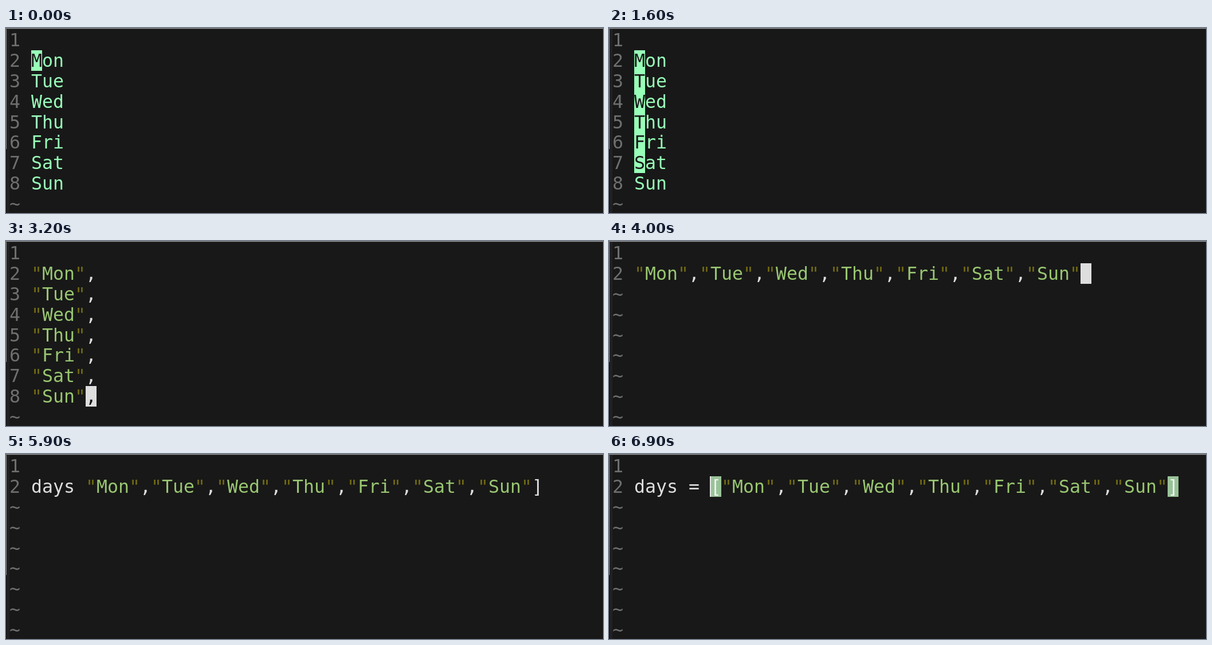
Write an HTML page that moves like this. It is 1042 by 324 pixels and loops after 7 s.

```html
<!DOCTYPE html>
<html lang="en">
<head>
<meta charset="utf-8">
<title>Editing a list of days</title>
<style>
  html, body { margin: 0; width: 100%; height: 100%; overflow: hidden; background: #181818; }
  #stage {
    position: relative; width: 1042px; height: 324px; overflow: hidden; background: #181818;
    font: 31.56px "DejaVu Sans Mono", monospace; color: #dedede;
  }
  .row { position: absolute; left: 6px; height: 36px; line-height: 36px; white-space: pre; }
  .row span { display: inline-block; height: 36px; vertical-align: top; }
  .gutter { color: #6f6f6f; }
  .quote { color: #716b12; }
  .string { color: #99c671; }
  .const { color: #98ffb8; }
  .plain { color: #dedede; }
  .row .block { color: #181818; }
  .block.quote { background: #716b12; }
  .block.string { background: #99c671; }
  .block.const { background: #98ffb8; }
  .block.plain { background: #dedede; }
  .row .match { background: #98c398; color: #f0f0f0; }
  #bar { position: absolute; width: 1.5px; height: 36px; background: #e4e4e4; }
  .edge { position: absolute; left: 0; top: 0; }
</style>
</head>
<body>
<div id="stage">
  <div class="edge" style="width:6px;height:324px;background:#212123"></div>
  <div class="edge" style="width:1px;height:324px;background:#0c0c10"></div>
  <div class="edge" style="width:1px;height:212px;background:#8a8a8a"></div>
  <div class="edge" style="width:1042px;height:1px;background:#a0a0a0"></div>
  <div class="edge" style="top:1px;width:1042px;height:1px;background:#3a3a3a"></div>
  <div id="text"></div>
  <div id="bar"></div>
</div>
<script>
const LOOP = 7000, CELL = 19, PITCH = 35.86, ROWS = 9, TEXT_X = 44;
const days = ["Mon", "Tue", "Wed", "Thu", "Fri", "Sat", "Sun"];
const opened = days.map(d => `"${d}`);
const quoted = opened.map(d => d + '"');
const listed = quoted.map(d => d + ",");
const trimmed = [...listed.slice(0, 6), quoted[6]];
const joined = quoted.join(",");
const closed = joined + "]";
const end = joined.length;

const rowTop = i => Math.round(3.14 + PITCH * i);
// Blocks on the given number of day lines, all in one column
const column = (count, col) => ({ blocks: Array.from({ length: count }, (_, i) => [i, col]) });
const block = (line, col) => ({ blocks: [[line, col]] });
const bar = (col, match = []) => ({ bar: col, match });

// [start in ms, lines below the empty first one, cursors]
const steps = [
  [0, days, block(0, 0)],
  [500, days, column(3, 0)],
  [600, days, column(5, 0)],
  [700, days, column(7, 0)],
  [1000, days, column(6, 0)],
  [1800, opened, column(6, 1)],
  [2100, opened, column(6, 0)],
  [2300, opened, column(6, 4)],
  [2500, quoted, column(6, 5)],
  [2800, listed, column(6, 6)],
  [3000, listed, column(7, 5)],
  [3100, listed, block(6, 5)],
  [3300, trimmed, block(6, 4)],
  [3600, [joined], block(0, 36)],
  [3900, [joined], block(0, end)],
  [4200, [joined], bar(end)],
  [4500, [closed], bar(end + 1)],
  [4700, [closed], block(0, end)],
  [4900, [closed], bar(0)],
  [5200, ["d" + closed], bar(1)],
  [5400, ["da" + closed], bar(2)],
  [5500, ["day" + closed], bar(3)],
  [5600, ["days" + closed], bar(4)],
  [5800, ["days " + closed], bar(5)],
  [5900, ["days " + closed], {}],
  [6100, ["days =" + closed], bar(6)],
  [6300, ["days = " + closed], bar(7)],
  [6500, ["days = [" + closed], bar(8, [7, end + 8])],
  [6700, ["days = [" + closed], bar(7, [7, end + 8])]
];

const textBox = document.getElementById("text");
const barBox = document.getElementById("bar");

// Strings may run over line ends; capitalised words outside them are constants
function colourise(lines) {
  let inString = false;
  return lines.map(line => {
    let inConst = false;
    return [...line].map(ch => {
      if (ch === '"') {
        inString = !inString;
        inConst = false;
        return "quote";
      }
      if (inString) return "string";
      inConst = /[A-Z]/.test(ch) || (inConst && /\w/.test(ch));
      return inConst ? "const" : "plain";
    });
  });
}

function span(parent, text, cls) {
  const el = document.createElement("span");
  el.textContent = text;
  el.className = cls;
  parent.append(el);
}

function render([, lines, { blocks = [], bar: barCol, match = [] }]) {
  const kinds = colourise(lines);
  textBox.replaceChildren();
  for (let i = 0; i < ROWS; i++) {
    const row = document.createElement("div");
    row.className = "row";
    row.style.top = rowTop(i) + "px";
    textBox.append(row);
    const used = i <= lines.length;
    span(row, used ? `${i + 1} ` : "~", "gutter");
    if (!used || i === 0) continue;

    const n = i - 1;
    const hit = blocks.find(([line]) => line === n);
    const text = hit ? lines[n].padEnd(hit[1] + 1) : lines[n];
    [...text].forEach((ch, col) => {
      let cls = kinds[n][col] || "plain";
      if (hit && hit[1] === col) cls += " block";
      if (match.includes(col)) cls += " match";
      span(row, ch, cls);
    });
  }
  barBox.hidden = barCol === undefined;
  barBox.style.left = TEXT_X - 1 + CELL * (barCol || 0) + "px";
  barBox.style.top = rowTop(1) + "px";
}

let shown;
const start = performance.now();
function tick() {
  const t = (performance.now() - start) % LOOP;
  const step = steps.findLast(s => s[0] <= t) || steps[0];
  if (step !== shown) render(shown = step);
  requestAnimationFrame(tick);
}
tick();
</script>
</body>
</html>
```
